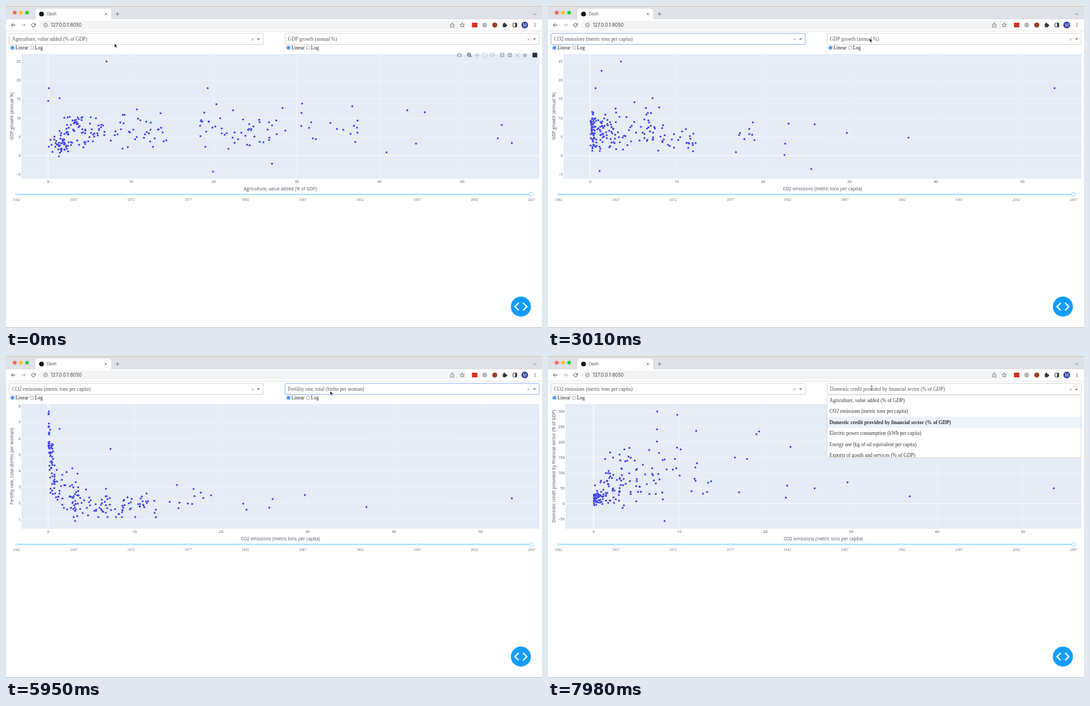
Recreate the animation shown at these times as an HTML page with a canvas. Size 800x482 px, loop 8 s.

```html
<!DOCTYPE html>
<html lang="en">
<head>
<meta charset="utf-8">
<title>Dash</title>
<style>
html, body { margin: 0; width: 100%; height: 100%; overflow: hidden; background: #fff; }
canvas { display: block; width: 800px; height: 482px; }
</style>
</head>
<body>
<canvas id="stage"></canvas>
<script>
const W = 800, H = 482, LOOP = 8000, STEP = 70;
const canvas = document.getElementById('stage');
const c = canvas.getContext('2d');
const ratio = window.devicePixelRatio || 1;
canvas.width = W * ratio;
canvas.height = H * ratio;

const SERIF = '"Liberation Serif", serif';
const SANS = '"Open Sans", sans-serif';
const UI = 'Inter, sans-serif';
const INK = '#4b5261';
const OPTIONS = [
  'Agriculture, value added (% of GDP)',
  'CO2 emissions (metric tons per capita)',
  'Domestic credit provided by financial sector (% of GDP)',
  'Electric power consumption (kWh per capita)',
  'Energy use (kg of oil equivalent per capita)',
  'Exports of goods and services (% of GDP)',
  'Fertility rate, total (births per woman)',
  'GDP growth (annual %)'
];
const AGRI = 0, CO2 = 1, CREDIT = 2, FERT = 6, GDP = 7;
const TOP = 72, BOTTOM = 258.5, RIGHT = 796, ROW = 16.5;

// ---------- drawing helpers ----------
function text(s, x, y, size, family, color, align = 'left', weight = '') {
  c.font = `${weight} ${size}px ${family}`;
  c.fillStyle = color;
  c.textAlign = align;
  c.fillText(s, x, y);
}
function rect(x, y, w, h, fill) {
  c.fillStyle = fill;
  c.fillRect(x, y, w, h);
}
function paint(fill, stroke, lw) {
  if (fill) { c.fillStyle = fill; c.fill(); }
  if (stroke) { c.strokeStyle = stroke; c.lineWidth = lw; c.stroke(); }
}
function round(x, y, w, h, r, fill, stroke, lw = 0.7) {
  c.beginPath();
  c.roundRect(x, y, w, h, r);
  paint(fill, stroke, lw);
}
function disc(x, y, r, fill, stroke, lw = 0.8) {
  c.beginPath();
  c.arc(x, y, r, 0, Math.PI * 2);
  paint(fill, stroke, lw);
}
function trace(p) {
  c.beginPath();
  for (let i = 0; i < p.length; i += 2) c.lineTo(p[i], p[i + 1]);
}
function line(color, lw, ...p) {
  trace(p);
  paint(null, color, lw);
}
function shape(fill, stroke, lw, ...p) {
  trace(p);
  c.closePath();
  paint(fill, stroke, lw);
}
function cross(color, lw, x, y, r) {
  line(color, lw, x - r, y - r, x + r, y + r);
  line(color, lw, x + r, y - r, x - r, y + r);
}
function plus(color, lw, x, y, r) {
  line(color, lw, x - r, y, x + r, y);
  line(color, lw, x, y - r, x, y + r);
}
const mix = (a, b, k) => a + (b - a) * k;
const mixRange = (a, b, k) => [mix(a[0], b[0], k), mix(a[1], b[1], k)];
const between = (t, a, b) => t >= a && t < b;

// ---------- scatter data ----------
let seed = 41;
const rnd = () => (seed = (seed * 16807) % 2147483647) / 2147483647;
const bell = () => (rnd() + rnd() + rnd() - 1.5) * 2;
const decay = () => -Math.log(1 - rnd() * 0.98);
const spread = (a, b) => a + rnd() * (b - a);
const many = (n, make) => Array.from({ length: n }, make);

const agri = [
  [150, 83], [64, 123], [63, 142], [80, 138], [301, 123], [314, 147], [442, 146], [599, 156],
  [625, 159], [740, 178], [734, 198], [755, 205], [612, 206], [568, 219], [309, 248], [397, 236],
  ...many(50, () => [Math.max(64, 81 + bell() * 8), 207 + bell() * 8]),
  ...many(62, () => [spread(86, 145), 186 + bell() * 13]),
  ...many(38, () => [spread(145, 240), 187 + bell() * 15]),
  ...many(46, () => [spread(285, 405), 189 + bell() * 13]),
  ...many(18, () => [spread(405, 525), 186 + bell() * 15])
];
const growth = [
  [756, 123], [538, 197], [446, 190], [398, 177], [359, 176], [354, 206], [353, 223], [393, 244],
  [109, 83], [80, 97], [71, 123], [156, 138], [129, 144], [77, 247],
  ...many(54, () => [spread(63.5, 70), 186 + bell() * 18]),
  ...many(60, () => [spread(66, 102), 189 + bell() * 14]),
  ...many(48, () => [spread(100, 175), 188 + bell() * 16]),
  ...many(24, () => [spread(170, 222), 199 + bell() * 10]),
  ...many(9, () => [spread(240, 312), 200 + bell() * 14])
];
const fertility = [
  [755, 213], [538, 226], [446, 208], [398, 214], [393, 227], [359, 230], [354, 221], [280, 199],
  [255, 193], [156, 139], [80, 109], [99, 168], [64, 83], [103, 247],
  ...many(58, () => {
    const u = rnd();
    return [63.5 + u * u * 9, mix(112, 174, u) + bell() * 19];
  }),
  ...many(42, () => [spread(65, 108), 203 + bell() * 14]),
  ...many(58, () => [spread(88, 175), Math.min(241, 226 + bell() * 11)]),
  ...many(30, () => [spread(165, 225), 223 + bell() * 9]),
  ...many(9, () => [spread(240, 315), 217 + bell() * 8])
];
const credit = [
  [163, 83], [193, 88], [311, 117], [315, 113], [362, 136], [279, 152], [297, 154], [447, 189],
  [540, 210], [755, 198], [357, 194], [355, 212], [398, 198], [174, 247],
  ...many(66, () => [68.5 + Math.min(decay() * 5, 18), 213 + bell() * 5]),
  ...many(46, () => [spread(70, 112), 202 + bell() * 13]),
  ...many(44, () => [spread(85, 178), 181 + bell() * 19]),
  ...many(26, () => [spread(105, 225), 153 + bell() * 18]),
  ...many(9, () => [spread(185, 290), 198 + bell() * 11])
];

// Each view: chosen columns, axis ranges and points placed within those axes.
const CO2_RANGE = [-3.1, 56.82], GDP_RANGE = [-6.117, 26.95];
const views = [
  { x: AGRI, y: GDP, left: 23, xr: [-3.236, 59.3], yr: GDP_RANGE, pts: agri },
  { x: CO2, y: GDP, left: 23, xr: CO2_RANGE, yr: GDP_RANGE, pts: growth },
  { x: CO2, y: FERT, left: 23, xr: CO2_RANGE, yr: [0.4215, 8.128], pts: fertility },
  { x: CO2, y: CREDIT, left: 26, xr: [-3.276, 56.79], yr: [-81.3, 323.2], pts: credit }
];
// pick: option clicked; start: axes begin to move, points swap when they stop
const changes = [
  { pick: 1330, start: 1453 },
  { pick: 4130, start: 4315 },
  { pick: 6860, start: 7000 }
];
const EASE_MS = 500;
const easeCubic = k => k < 0.5 ? 4 * k ** 3 : 1 - 4 * (1 - k) ** 3;

const menus = [
  { side: 0, from: 490, to: 1330, scroll: 0 },
  { side: 1, from: 3150, to: 4130, scroll: 2 * ROW },
  { side: 1, from: 6000, to: 6860, scroll: ROW },
  { side: 1, from: 7900, to: 8000, scroll: 0 }
];
const focusSpans = [[[1330, 3150]], [[4130, 6000], [6860, 7900]]];
const barSpans = [[0, 280], [1330, 2600], [4130, 5850], [6900, 7500]];
const inSpans = (t, spans) => spans.some(s => between(t, s[0], s[1]));

// time, x, y
const path = [
  [0, 162, 56], [500, 167, 49], [1330, 192, 83], [1680, 215, 92], [3010, 480, 48], [3640, 482, 115],
  [4200, 483, 131], [4690, 477, 127], [5530, 477, 127], [6000, 484, 50], [6720, 487, 76],
  [6900, 487, 79], [7600, 483, 48], [8000, 483, 48]
];
function pointer(t) {
  const i = Math.max(1, path.findIndex(p => p[0] >= t));
  const a = path[i - 1], b = path[i];
  const k = (t - a[0]) / (b[0] - a[0]), e = k * k * (3 - 2 * k);
  return { x: mix(a[1], b[1], e), y: mix(a[2], b[2], e) };
}

// ---------- browser window ----------
function drawBrowser() {
  rect(0, 0, W, H, '#fff');
  rect(0, 0, W, 20, '#dee1e6');
  rect(0, 0, W, 1, '#d3c9a6');
  ['#fe5f57', '#febc2e', '#28c840'].forEach((col, i) => disc(13 + 9.2 * i, 10, 2.8, col));
  round(44, 4, 113, 18, 4, '#fff');
  rect(0, 20, W, 17, '#fff');
  disc(53, 12, 3.6, '#111');
  text('Dash', 61, 14.3, 6, UI, '#555');
  cross('#666', 0.8, 149, 12, 1.6);
  plus('#666', 0.8, 166.5, 12, 2.6);
  line('#666', 0.8, 787, 11, 789.3, 13.2, 791.6, 11);

  [[11, '#555', -1], [26, '#aaa', 1]].forEach(([x, col, d]) => {
    line(col, 0.9, x - 3 * d, 28.5, x + 3 * d, 28.5);
    line(col, 0.9, x + 0.2 * d, 25.7, x + 3 * d, 28.5, x + 0.2 * d, 31.3);
  });
  c.beginPath();
  c.arc(41, 28.5, 2.7, -0.5, 5);
  paint(null, '#555', 0.9);
  shape('#555', null, 0, 44.2, 25.2, 44.2, 28, 41.4, 28);

  round(50, 22, 638, 13, 6.5, '#f1f3f4');
  disc(59, 28.5, 2.8, null, '#666', 0.7);
  line('#666', 0.7, 59, 28, 59, 30);
  rect(58.6, 26.7, 0.8, 0.8, '#666');
  text('127.0.0.1:8050', 67, 31, 7, UI, '#444');
  line('#666', 0.7, 664.5, 27.5, 663.4, 27.5, 663.4, 31.5, 668.6, 31.5, 668.6, 27.5, 667.5, 27.5);
  line('#666', 0.7, 666, 29.5, 666, 25);
  line('#666', 0.7, 664.5, 26.4, 666, 25, 667.5, 26.4);
  const star = [];
  for (let i = 0; i < 10; i++) {
    const a = -Math.PI / 2 + i * Math.PI / 5, r = i % 2 ? 1.5 : 3.5;
    star.push(681 + r * Math.cos(a), 28.6 + r * Math.sin(a));
  }
  shape(null, '#666', 0.7, ...star);
  rect(695.5, 25, 8, 7, '#d92b1f');
  disc(714.5, 28.5, 3.7, '#b8b8b8');
  disc(729.5, 28.5, 3.7, '#a23c22');
  round(741.5, 26.7, 5, 5, 0.7, '#333');
  disc(743.8, 26.3, 1.3, '#333');
  disc(746.9, 29, 1.2, '#333');
  round(756.7, 25.7, 5.6, 5.6, 0.6, null, '#333', 0.9);
  rect(760, 25.5, 2.4, 6, '#333');
  disc(774.3, 28.5, 5, '#303f9f');
  text('M', 774.3, 30.6, 5.8, UI, '#fff', 'center');
  for (let i = -1; i < 2; i++) disc(789.5, 28.5 + i * 2.3, 0.75, '#555');
  rect(0, 37, W, 0.7, '#dcdcdc');
}

// ---------- controls ----------
function drawSelect(side, value, open, focused) {
  const x = 4 + 412 * side;
  round(x + 0.5, 41, 379.5, 16.6, 2, '#fff', focused ? '#7d9ce9' : '#ccc', 0.8);
  text(OPTIONS[value], x + 5 - 0.2 * side, 52, 7.5, SERIF, '#555');
  cross('#999', 0.7, x + 364, 50, 1.6);
  const d = open ? -1.2 : 1.2;
  shape('#777', null, 0, x + 370.6, 49.7 - d, x + 375.2, 49.7 - d, x + 372.9, 49.7 + d);
}
function drawRadios(side) {
  const x = 412 * side;
  disc(x + 9.6, 62.6, 2.6, '#fff', '#1672f3', 0.9);
  disc(x + 9.6, 62.6, 1.5, '#1672f3');
  text('Linear', x + 14, 65.4, 7.5, SERIF, '#222');
  disc(x + 38.8, 62.6, 2.6, '#fff', '#777', 0.6);
  text('Log', x + 43, 65.4, 7.5, SERIF, '#222');
}
function drawMenu(menu, value, mouse) {
  const x = 4 + 412 * menu.side, top = 58, height = 94;
  rect(x, top, 380, height, '#fff');
  c.save();
  c.beginPath();
  c.rect(x, top, 380, height);
  c.clip();
  const hover = mouse.y > top ? Math.floor((mouse.y - top + menu.scroll) / ROW) : value;
  OPTIONS.forEach((name, i) => {
    const y = top + i * ROW - menu.scroll;
    if (i === hover) rect(x, y, 380, ROW, '#ebf3fb');
    text(name, x + 4, y + 10.6, 7.5, SERIF, '#333', 'left', i === value ? 'bold' : '');
  });
  c.restore();
  round(x + 0.4, top, 379.4, height, 1, null, '#ccc', 0.7);
  if (menu.scroll) round(x + 376, top + 1 + menu.scroll * 0.384, 2.6, 36, 1.3, '#888');
}
function drawSlider() {
  rect(15, 281, 770, 2, '#abe2fb');
  for (let i = 0; i < 10; i++) {
    const x = 15.7 + i * 85.43;
    disc(x, 282, 1.5, '#fff', '#abdcf2', 0.9);
    text(String(1962 + 5 * i), x, 291.8, 5.6, SERIF, '#777', 'center');
  }
  disc(784.5, 282, 2.9, '#fff', '#96dbfa', 1);
}
function drawDevButton() {
  disc(768.5, 450, 15, '#119dff');
  for (const d of [-1, 1]) {
    line('#fff', 2, 768.5 + 3.2 * d, 444.4, 768.5 + 8.9 * d, 450, 768.5 + 3.2 * d, 455.6);
  }
}

// ---------- chart ----------
function tickStep(range) {
  const rough = (range[1] - range[0]) / 9.9;
  const base = 10 ** Math.floor(Math.log10(rough));
  return base * [1, 2, 5, 10].find(m => m * base >= rough);
}
function ticks(range, draw) {
  const step = tickStep(range);
  for (let i = Math.ceil(range[0] / step); i * step <= range[1]; i++) draw(i * step);
}
function scale(range, a, b) {
  return v => a + (v - range[0]) / (range[1] - range[0]) * (b - a);
}
const gridColor = v => v ? 'rgba(255,255,255,.7)' : '#fff';
const gridWidth = v => v ? 0.5 : 1;
const label = v => String(v).replace('-', '\u2212');

function drawChart(shown, titled, xr, yr) {
  const left = shown.left;
  const sx = scale(xr, left, RIGHT), sy = scale(yr, BOTTOM, TOP);
  rect(left, TOP, RIGHT - left, BOTTOM - TOP, '#e5ecf6');
  ticks(xr, v => {
    const x = sx(v);
    line(gridColor(v), gridWidth(v), x, TOP, x, BOTTOM);
    text(label(v), x, 264.9, 5.6, SANS, INK, 'center');
  });
  ticks(yr, v => {
    const y = sy(v);
    line(gridColor(v), gridWidth(v), left, y, RIGHT, y);
    text(label(v), left - 1, y + 2.1, 5.6, SANS, INK, 'right');
  });
  text(OPTIONS[titled.x], (left + RIGHT) / 2, 276.4, 6.6, SANS, INK, 'center');
  c.save();
  c.translate(11.4, 165);
  c.rotate(-Math.PI / 2);
  text(OPTIONS[titled.y], 0, 0, 6.6, SANS, INK, 'center');
  c.restore();

  const toX = scale([left, RIGHT], ...shown.xr), toY = scale([BOTTOM, TOP], ...shown.yr);
  c.save();
  c.beginPath();
  c.rect(left, TOP, RIGHT - left, BOTTOM - TOP);
  c.clip();
  for (const [x, y] of shown.pts) {
    disc(sx(toX(x)), sy(toY(y)), 1.5, 'rgba(20,20,235,.88)', 'rgba(229,236,246,.55)', 0.5);
  }
  c.restore();
}
function drawModebar() {
  const soft = '#b3b9c4', dark = '#69717f', paper = '#e5ecf6', y = 73.5;
  round(673.3, y - 2, 7, 5, 0.8, soft);
  rect(675.3, y - 3, 3, 1.5, soft);
  disc(676.8, y + 0.5, 1.4, paper);
  disc(691, y - 0.6, 2.3, null, dark, 1.1);
  line(dark, 1.2, 692.6, y + 1, 694.8, y + 3.2);
  plus(dark, 0.7, 691, y - 0.6, 1.2);
  plus(soft, 1, 703.3, y, 3.5);
  c.setLineDash([1.4, 0.8]);
  round(711.6, y - 3, 6, 6, 0, null, soft, 0.8);
  c.setLineDash([]);
  c.beginPath();
  c.ellipse(726, y - 0.8, 3.3, 2.2, -0.2, 0, 7);
  paint(null, soft, 1);
  line(soft, 0.9, 724, y + 1, 724.6, y + 3.4);
  for (const x of [740.5, 752]) rect(x - 3.2, y - 3.2, 6.4, 6.4, soft);
  plus(paper, 0.9, 740.5, y, 2);
  line(paper, 0.9, 750, y, 754, y);
  cross(soft, 1, 763.2, y, 3.2);
  shape(soft, null, 0, 770.8, y, 774.5, y - 3.4, 778.2, y, 777, y, 777, y + 3, 772, y + 3, 772, y);
  rect(785.8, y - 3.6, 7, 7, '#2b3038');
}

// ---------- pointer ----------
function drawPointer({ x, y }, kind) {
  if (kind === 'cross') {
    plus('#9ba1aa', 0.6, x, y, 2.4);
  } else if (kind === 'beam') {
    line('#333', 0.7, x, y - 3.3, x, y + 3.3);
    for (const d of [-1, 1]) line('#333', 0.6, x - 1.3, y + 3.6 * d, x, y + 3 * d, x + 1.3, y + 3.6 * d);
  } else if (kind === 'hand') {
    shape('#fff', '#333', 0.7, x - 0.8, y, x + 0.5, y, x + 0.6, y + 2.6, x + 3.5, y + 3.3,
      x + 3.3, y + 5.8, x + 2.5, y + 7.5, x - 1, y + 7.5, x - 3, y + 4.6, x - 2.4, y + 4, x - 0.8, y + 5);
  } else {
    shape('#111', '#fff', 0.5, x, y, x, y + 6.2, x + 1.5, y + 4.9, x + 2.5, y + 7, x + 3.5, y + 6.5,
      x + 2.5, y + 4.5, x + 4.3, y + 4.4);
  }
}

// ---------- frame ----------
function draw(t) {
  c.setTransform(ratio, 0, 0, ratio, 0, 0);
  let picked = 0, moved = 0, shown = 0, k = 1;
  changes.forEach((ch, i) => {
    if (t >= ch.pick) picked = i + 1;
    if (t >= ch.start) {
      moved = i + 1;
      k = Math.min(1, (t - ch.start) / EASE_MS);
      shown = k < 1 ? i : i + 1;
    }
  });
  const to = views[moved], from = views[Math.max(0, moved - 1)], e = easeCubic(k);
  const menu = menus.find(m => between(t, m.from, m.to));
  const mouse = pointer(t);
  const value = views[picked];

  drawBrowser();
  drawChart(views[shown], to, mixRange(from.xr, to.xr, e), mixRange(from.yr, to.yr, e));
  if (inSpans(t, barSpans)) drawModebar();
  for (const side of [0, 1]) {
    const open = !!menu && menu.side === side;
    drawSelect(side, side ? value.y : value.x, open, inSpans(t, focusSpans[side]));
    drawRadios(side);
  }
  drawSlider();
  drawDevButton();
  if (menu) drawMenu(menu, menu.side ? value.y : value.x, mouse);
  rect(0, 481, W, 1, '#c4c4c4');

  let kind = 'arrow';
  if (menu && mouse.y > 58) kind = 'hand';
  else if (mouse.y > TOP) kind = 'cross';
  else if (t > 7400) kind = 'beam';
  drawPointer(mouse, kind);
}

const began = performance.now();
function tick() {
  const t = (performance.now() - began) % LOOP;
  draw(Math.floor(t / STEP) * STEP);
  requestAnimationFrame(tick);
}
tick();
</script>
</body>
</html>
```
